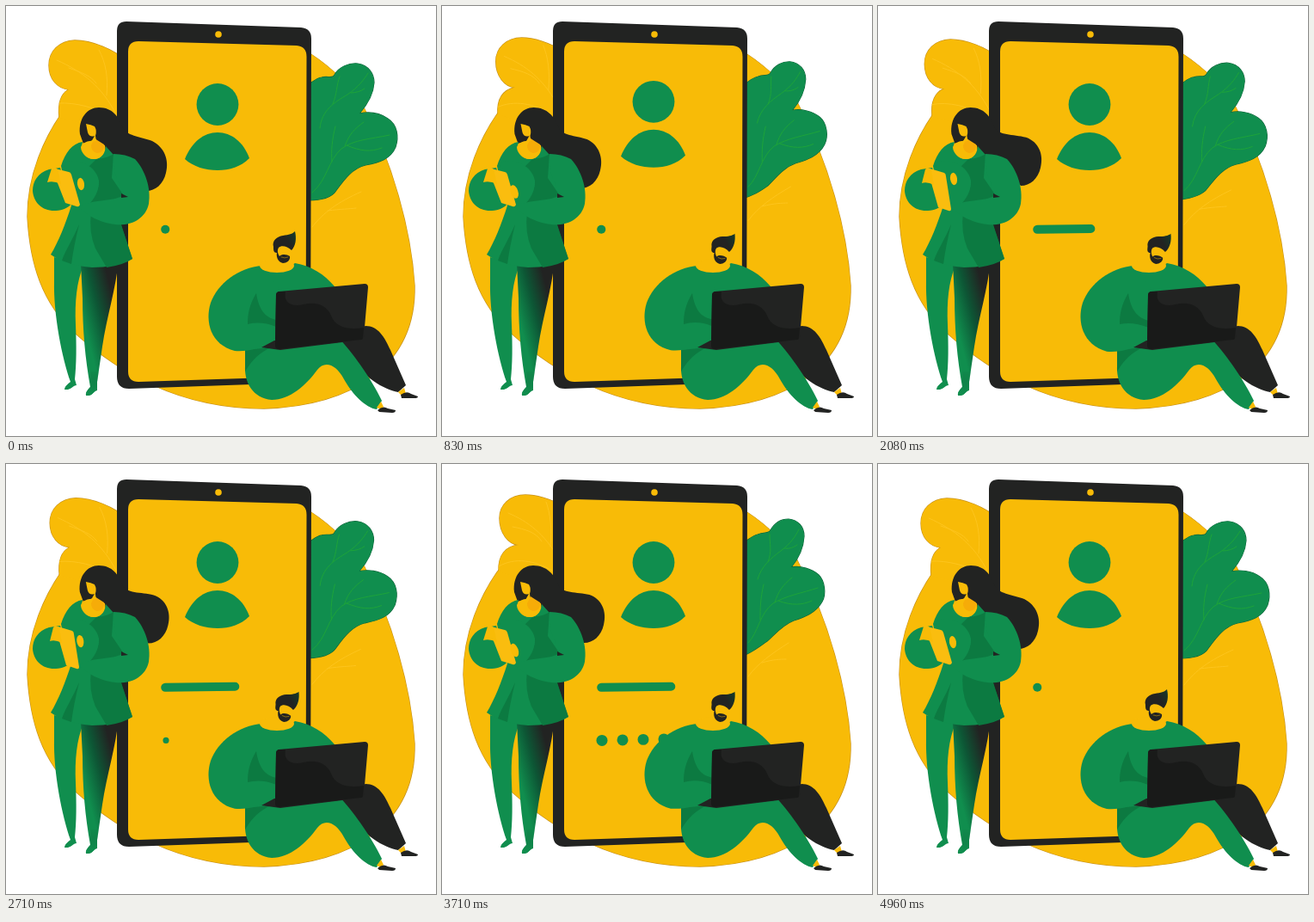
An HTML page with a canvas for the animation above (5 s loop, 500 by 500 pixels).

```html
<!DOCTYPE html>
<html lang="en">
<head>
<meta charset="utf-8">
<title>Login</title>
<style>
html, body { margin: 0; width: 100%; height: 100%; overflow: hidden; background: #fff; }
canvas { display: block; width: 100vmin; height: 100vmin; }
</style>
</head>
<body>
<canvas id="stage"></canvas>
<script>
const canvas = document.getElementById('stage');
const ctx = canvas.getContext('2d');
const ratio = window.devicePixelRatio || 1;
canvas.width = canvas.height = 500 * ratio;

const LOOP = 5000;
const YELLOW = '#f8bb07', GREEN = '#108e4e', SHADE = '#0c7a41', DARK = '#222322', VEIN = '#1da43a', PALE = '#fec51d', RIM = '#c8921a';

const clamp = v => Math.max(0, Math.min(1, v));
const smooth = v => { v = clamp(v); return v * v * (3 - 2 * v); };
const ramp = (t, a, b) => smooth((t - a) / (b - a));

function keyed(t, keys) {
  let i = 1;
  while (i < keys.length - 1 && t > keys[i][0]) i++;
  const [t0, a] = keys[i - 1], [t1, b] = keys[i];
  return a + (b - a) * ramp(t, t0, t1);
}

// blends two path strings that share one structure
function morph(a, b, s) {
  const ends = b.match(/-?[\d.]+/g);
  let i = 0;
  return a.replace(/-?[\d.]+/g, n => (+n + (ends[i++] - n) * s).toFixed(2));
}

function fill(d, color) {
  ctx.fillStyle = color;
  ctx.fill(new Path2D(d));
}

function line(d, color, width = 1) {
  ctx.strokeStyle = color;
  ctx.lineWidth = width;
  ctx.lineCap = 'round';
  ctx.stroke(new Path2D(d));
}

function disc(x, y, r, color, ry = r, turn = 0) {
  ctx.fillStyle = color;
  ctx.beginPath();
  ctx.ellipse(x, y, r, ry, turn, 0, 7);
  ctx.fill();
}

function blend(x0, y0, x1, y1, ...stops) {
  const g = ctx.createLinearGradient(x0, y0, x1, y1);
  stops.forEach((c, i) => g.addColorStop(i / (stops.length - 1), c));
  return g;
}

function moved(x, y, draw) {
  ctx.save();
  ctx.translate(x, y);
  draw();
  ctx.restore();
}

function turned(x, y, angle, draw) {
  ctx.save();
  ctx.translate(x, y);
  ctx.rotate(angle);
  ctx.translate(-x, -y);
  draw();
  ctx.restore();
}

function backdrop(sway) {
  const blob = 'M64 126C46 152 25 195 25 245C28 300 42 345 80 380C130 425 200 468 300 468C400 465 477 420 475 325C471 262 450 182 412 110C392 84 372 66 345 50L130 80C100 92 78 108 64 126Z';
  const leftLeaf = morph(
    'M140 64C126 51 100 40 80 40C62 41 50 52 50 69C50 85 60 96 73 97C64 102 60 112 62 130L140 150',
    'M140 49C126 40 108 36 97 36C79 36 67 48 67 63C67 80 77 93 89 94C74 96 65 106 66 125L140 150', sway);
  line(leftLeaf, RIM, 1.4);
  line(blob, RIM, 1.4);
  fill(blob, YELLOW);
  fill(leftLeaf, YELLOW);
  line(morph(
    'M59 63C89 76 112 94 128 126M108 51C116 66 119 82 117 104M73 72C87 77 99 81 105 90M62 113C80 112 104 118 122 128',
    'M77 57C101 67 119 82 134 107M121 44C126 57 128 76 126 96M82 73C97 76 109 79 116 90M66 119C85 108 108 112 128 124', sway), PALE);

  const rightLeaf = morph(
    'M345 94C354 92 359 84 367 83C374 81 380 85 382 80C387 71 399 66 409 67C422 69 428 79 428 89C427 105 418 117 411 125C421 123 434 124 444 131C455 138 457 152 453 164C447 178 434 182 418 185C401 189 391 205 382 217C374 225 362 226 345 226Z',
    'M345 94C354 91 359 84 367 82C376 79 380 81 382 77C387 68 395 64 403 64C414 65 421 73 421 84C420 101 412 113 406 120C417 118 430 122 438 129C445 136 447 151 442 160C435 173 421 178 409 182C396 187 387 198 378 206C370 211 362 219 345 225Z', sway);
  line(rightLeaf, '#0b6338', 1.2);
  fill(rightLeaf, GREEN);
  line(morph(
    'M365 142C367 121 382 112 397 103C410 94 416 86 421 78M388 82C384 93 385 102 380 114M401 101C407 101 413 99 417 96M356 217C374 202 374 180 390 166C405 155 423 155 446 150M383 140C379 156 378 168 379 181M416 135C405 143 399 149 394 163M396 162C413 169 424 170 437 165',
    'M367 134C371 119 383 109 394 101C406 92 411 84 415 76M381 82C381 94 384 101 379 114M398 98C404 99 409 97 413 94M356 208C368 196 369 174 385 162C400 153 419 150 437 144M374 140C370 157 370 168 370 181M407 132C396 141 391 148 387 161M391 159C407 165 419 164 430 159', sway), VEIN);
  line(morph(
    'M356 257C369 240 386 228 413 216M374 238C390 236 399 236 407 235',
    'M356 247C367 232 384 220 403 208M372 231C386 227 393 227 400 227', sway), PALE);
}

function phone(t) {
  fill('M140 18L343 25Q355 26 355 38L354 426Q354 437 342 438L143 445Q129 445 129 431V29Q129 18 140 18Z', DARK);
  fill('M154 41L338 46Q349.5 47 349.5 59L348.5 419Q348 431 336 431L154 437Q142 437 142 425V53Q142 41 154 41Z', YELLOW);
  disc(247, 33, 3.8, YELLOW);

  const bob = keyed(t, [[0, 0], [480, 0], [850, -3.2], [1340, 1.6], [1700, 0], [5000, 0]]);
  moved(0, bob, () => {
    disc(246, 114.5, 24.4, GREEN);
    fill('M208 178C216 158 230 147 246 147C262 147 276 158 283 177C273 187 260 191 246 191C232 191 218 187 208 178Z', GREEN);
  });

  const out = ramp(t, 4380, 4860);
  const grow = ramp(t, 990, 2580) * (1 - out);
  line(`M185.2 259.8L${185.3 + 81 * grow} ${259.8 - grow}`, GREEN, 10);

  for (let i = 0; i < 4; i++) {
    const u = (t - 2650 - 100 * i) / 1000;
    if (u <= 0 || out >= 1) continue;
    const size = (1 - Math.exp(-6 * u) * Math.cos(14 * u)) * (1 - out);
    disc(186 + 24 * i, 321.4 - 0.5 * i, 6.5 * Math.max(0, size), GREEN);
  }
}

function womanHair(t, sway) {
  const swing = keyed(t, [[0, 0], [830, -2], [1380, -3], [2080, 3], [3250, 2], [4210, 2], [5000, 0]]);
  const lift = keyed(t, [[0, 0], [830, -3], [1380, -3], [2080, -6], [3250, -7], [4210, -7], [5000, 0]]);
  const hx = -2 * sway;
  const tail = (x, y, k = 1) => `${x + swing * k} ${y + lift * k}`;
  fill(`M${86 + hx} 149C${84 + hx} 130 ${95 + hx} 118 ${108 + hx} 118C${124 + hx} 118 131 129 135 140C139 151 ${tail(156, 152, 0.5)} ${tail(170, 157, 0.7)}C${tail(184, 164)} ${tail(190, 179)} ${tail(186, 194)}C${tail(183, 207)} ${tail(174, 215)} ${tail(163, 215)}L142 180L120 176L101 156L${90 + hx} 160Z`, DARK);
}

function womanFace(sway) {
  fill('M89 160Q96 156 103 157L115 162C117 170 111 178 102 178C93 178 87 170 87 164Z', YELLOW);
  fill('M103 154L114 161C115 167 111 171 106 171C101 170 99 166 99 162Z', '#f6ac08');
  moved(-2 * sway, 0, () =>
    fill('M93 137Q99 138 103 140Q106 145 104 151L105 157L99 158L103 151Q97 153 95 147Z', YELLOW));
}

function woman(t, sway) {
  // legs
  fill('M56 292L90 302C82 321 80 344 81 370C82 396 82 416 80 434L82 441C78 441 76 447 68 446Q68 442 75 437C65 409 55 358 56 320Z', GREEN);
  fill('M87 300L131 295C128 328 117 362 112 396L106 437L106 447C102 447 101 454 93 453Q92 449 98 443C92 410 89 376 89 340Z',
    blend(82, 335, 121, 325, GREEN, '#0d5635', DARK));
  fill('M98 425L108 425L106 437L106 447C102 447 101 454 93 453Q92 449 98 443Z', blend(0, 422, 0, 450, '#10653b00', GREEN));

  womanHair(t, sway);

  // dress
  fill('M89 158C77 160 69 170 64 186L70 214L76 232C69 254 61 274 52 289Q70 302 100 304Q127 304 147 294L132 250L140 220L125 173L116 163C114 174 109 178 102 178C93 178 87 167 89 158Z', GREEN);
  fill('M105 178C116 177 122 174 125 172L123 200L138 222Q119 229 96 231C111 216 112 197 96 187Z', SHADE);
  fill('M99 240Q96 263 104 282L117 304Q137 301 147 294L133 251Q113 253 99 240Z', SHADE);
  fill('M85 254C78 271 69 284 65 296L76 300Q79 278 85 254Z', SHADE);
  womanFace(sway);

  // arms
  fill('M50 190C37 194 31 204 31 215C32 229 43 239 58 238C66 238 73 234 76 230L63 188Z', GREEN);
  fill('M65 183C83 174 105 186 108 203C109 216 99 229 88 237L74 193Z', GREEN);
  fill('M125 172Q139 172 150 178C162 191 169 212 166 230C162 248 145 256 127 254C107 252 91 241 84 233C104 224 126 228 139 219C132 208 123 195 125 172Z', GREEN);
  fill('M134 218L142 222L134 223Z', DARK);

  // tablet and hands
  const tilt = ramp(t, 1450, 1900) * (1 - ramp(t, 2780, 3200));
  fill(morph('M53 188L73 193Q75 193 76 196L86 231Q85 234 82 233L69 229Z',
             'M57 188L77 194Q79 195 79 198L85 236Q85 239 82 238L70 234Z', tilt), '#fabd0f');
  fill(morph('M48 205L53 189Q56 186 60 190L64 207Q55 203 48 205Z',
             'M51 206L55 190Q58 187 62 191L65 208Q57 204 51 206Z', tilt), YELLOW);
  const hx = keyed(t, [[0, 87], [830, 84], [1380, 83.5], [2080, 88], [3250, 85], [4210, 83.5], [5000, 87]]);
  const hy = keyed(t, [[0, 207], [830, 216], [1380, 225], [2080, 201], [3250, 210], [4210, 224], [5000, 207]]);
  const tap = clamp((hy - 207) / 15);
  disc(hx, hy, 4 + tap * 0.6, YELLOW, 7.2 + tap * 1.4, -0.15 - tap * 0.3);
}

function manHead(t) {
  const nod = ramp(t, 80, 620) * (1 - ramp(t, 4350, 4880));
  disc(315, 302, 20, YELLOW, 8);
  turned(315, 302, 0.115 * nod, () => {
    fill('M311 280C309 273 315 268 322 267C329 266 333 265 336 262C338 270 337 279 332 284C327 279 320 278 317 281C315 284 316 288 318 291C321 288 327 289 330 291C331 296 326 299 322 299C316 298 314 291 315 287C311 287 311 284 311 280Z',
      blend(314, 282, 340, 264, DARK, DARK, '#123f2a'));
    line('M320 292Q324 294 328 292', '#8d7014', 0.9);
  });
}

function man(t) {
  // far leg
  fill('M382 388L418 372C433 372 440 385 447 400L465 441L456 449C438 445 418 434 397 404Z', DARK);
  fill('M456 449L463 444L465 451L460 453Z', YELLOW);
  fill('M459 452Q466 447 471 451L479 454Q479 456 475 456L460 456Z', DARK);

  // near leg
  fill('M278 396L387 386C402 402 425 433 437 459L431 469C418 467 403 452 393 434C384 416 370 412 362 423C349 441 330 458 309 458C287 456 277 438 278 418Z', GREEN);
  fill('M278 400L309 397C295 402 286 412 278 425Z', SHADE);
  fill('M431 467L436 460L439 466L436 469Z', YELLOW);
  fill('M432 470Q438 464 444 468L453 470Q453 473 449 473L434 472Z', DARK);

  // body and typing arm
  fill('M296 302Q315 315 336 299C355 302 370 312 382 326L350 390L282 398L270 330Z', GREEN);
  const type = t < 4900 ? Math.sin(t / 490 * 2 * Math.PI) : 0;
  const dy = 0.8 * type;
  fill(`M298 302C270 304 246 323 238 345C231 367 238 394 266 ${401 + dy}C280 ${402 + dy} 297 ${399 + dy} 314 ${388 + dy}L319 331Z`, GREEN);
  fill(`M291 334C283 347 281 358 281 370Q297 ${366 + dy} 314 ${373 + dy}L314 ${365 + dy}C301 362 294 353 291 334Z`, SHADE);
  manHead(t);

  // laptop
  fill('M297 397L312 389L390 386L415 388L319 400Z', DARK);
  fill('M317 332L417 323Q421 323 421 327L416 385Q416 388 413 388L317 399Q313 399 313 395L314 336Q314 333 317 332Z', DARK);
  fill('M325 332C322 346 333 350 346 347C363 343 374 350 378 360C383 374 399 377 416 374L415 386Q415 388 412 388L317 399Q313 399 313 395L314 336Q314 333 317 332Z', '#191a19');
}

function draw(t) {
  const sway = (1 - Math.cos(t / 2500 * 2 * Math.PI)) / 2;
  ctx.setTransform(ratio, 0, 0, ratio, 0, 0);
  ctx.fillStyle = '#fff';
  ctx.fillRect(0, 0, 500, 500);
  backdrop(sway);
  phone(t);
  woman(t, sway);
  man(t);
}

const start = performance.now();
function tick() {
  draw((performance.now() - start) % LOOP);
  requestAnimationFrame(tick);
}
tick();
</script>
</body>
</html>
```
